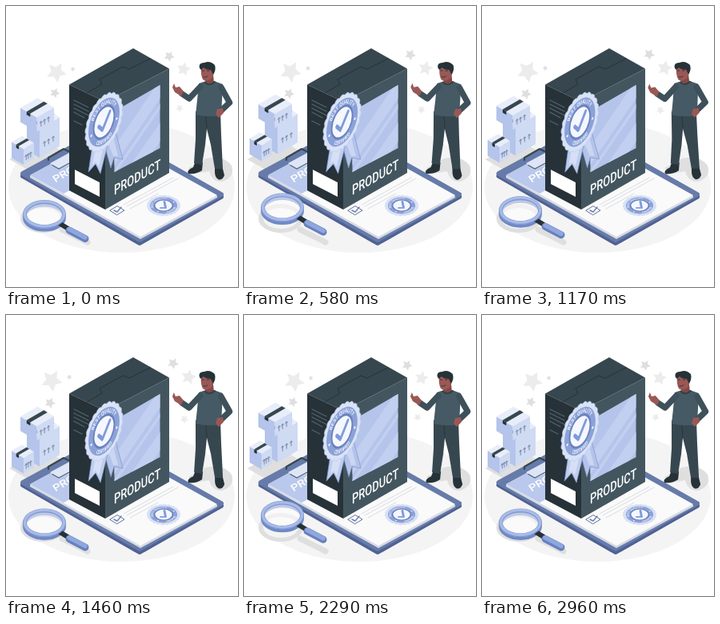
Recreate the animation shown at these times as an HTML page. Size 290x352 px, loop 3 s.

```html
<!DOCTYPE html>
<html lang="en">
<head>
<meta charset="utf-8">
<title>Product quality</title>
<style>
  html, body { margin: 0; width: 100%; height: 100%; overflow: hidden; background: #fff; }
  svg { display: block; width: 100vw; height: 100vh; }
  text { font-family: Roboto, Inter, sans-serif; font-weight: 500; fill: #fff; }
  .line { fill: none; stroke-linecap: round; stroke-linejoin: round; }
</style>
</head>
<body>
<svg viewBox="0 0 290 352">
  <defs>
    <path id="arcTop" d="M-20 0A20 20 0 0 1 20 0"/>
    <path id="arcLow" d="M-24.4 0A24.4 24.4 0 0 0 24.4 0"/>
    <clipPath id="pane"><path d="M135.5 132L192.5 99V178L135.5 208Z"/></clipPath>
    <g id="seal">
      <path class="scallop" fill="#d9e2f6" stroke="#b9c7ec" stroke-width=".7"/>
      <circle r="26.3" fill="#8ba2d9"/>
      <circle r="17.5" fill="#f4f7fd" stroke="#6a80bd" stroke-width="2.4"/>
      <path class="line" d="M-9 1L-2.5 8L10-8" stroke="#809ada" stroke-width="4.4"/>
      <text font-size="6.5" text-anchor="middle" font-weight="700"><textPath href="#arcTop" startOffset="50%">BEST QUALITY</textPath></text>
      <text font-size="6" text-anchor="middle" font-weight="700"><textPath href="#arcLow" startOffset="50%">CERTIFIED</textPath></text>
      <circle cx="-21.5" cy="6" r="1.4" fill="#fff"/>
      <circle cx="21.5" cy="6" r="1.4" fill="#fff"/>
    </g>
  </defs>

  <ellipse cx="144.5" cy="227" rx="141.5" ry="82" fill="#f4f4f4"/>
  <g id="stars"></g>

  <!-- ground shadows -->
  <g fill="#dfdfdf">
    <path d="M4 192L27 205L72 183L48 169Z"/>
    <path d="M228 203L250 191Q272 186 282 200Q287 214 270 220Q258 221 254 207L236 210Z"/>
    <ellipse cx="46" cy="266" rx="28" ry="18"/>
    <path class="line" d="M70 280L102 296" stroke="#dfdfdf" stroke-width="7"/>
  </g>
  <ellipse cx="46" cy="266" rx="22" ry="13" fill="#f4f4f4"/>

  <!-- clipboard -->
  <g stroke-linejoin="round" stroke-width="6">
    <path d="M21 213L124 157L269 239L167 297Z" fill="#506193" stroke="#506193"/>
    <path d="M21 210L124 154L269 236L167 293Z" fill="#667ba9" stroke="#667ba9"/>
  </g>
  <path d="M30 213L126 161L264 238V240L168 292L30 215Z" fill="#d6dae4"/>
  <path d="M30 212L126 160L264 237L168 289Z" fill="#fafafa"/>
  <path d="M30 212L126 160L168 183L72 235Z" fill="#b9c8ec"/>
  <text transform="matrix(.8 -.46 .45 .65 62 221.5)" font-size="16" font-weight="700">PRODUCT</text>
  <path d="M55 197L79 184V199L66 204Z" fill="#dde5f6"/>
  <path class="line" d="M53 193V190L72 179L78 182" stroke="#37474f" stroke-width="2.2"/>
  <path class="line" d="M58 199.5L66 204L79 197" stroke="#52656f" stroke-width="1.4"/>
  <g class="line" stroke="#d9dce3" stroke-width="1">
    <path d="M147 249L209 215M151 251L215 216M155 254L190 235"/>
  </g>
  <path class="line" d="M130 256L139 250.5L148 256L139 261.5Z" stroke="#526488" stroke-width=".9"/>
  <path class="line" d="M135 256L139 258L144 252" stroke="#6a80bd" stroke-width="1.4"/>
  <use href="#seal" transform="matrix(.46 -.28 .46 .28 197 250)"/>

  <!-- product box -->
  <path d="M79 98.5L159 53L204 78.5L124 120Z" fill="#37474f"/>
  <path d="M79 98.5L124 120V255L79 231Z" fill="#263238"/>
  <path d="M124 120L204 78.5V209L124 255Z" fill="#43565f"/>
  <path class="line" d="M101 109L120 98L117 92L146 76L154 79L180 66" stroke="#263238" stroke-width="1"/>
  <path class="line" d="M85 118L103 127M85 123L103 132M85 128L103 137M85 133L98 140M85 144L95 149" stroke="#52656f" stroke-width="1.2"/>
  <path d="M86 205L117 221V239L86 223Z" fill="#fff"/>
  <g clip-path="url(#pane)">
    <path d="M130 90H200V215H130Z" fill="#b5c4ea"/>
    <path d="M130 184L200 82V105L130 207ZM130 214L200 112V118L130 220ZM148 210L200 136V159L164 212Z" fill="#c2cff0"/>
  </g>
  <text transform="matrix(.74 -.42 0 1 135 237)" font-size="17.5">PRODUCT</text>

  <g id="badge">
    <path d="M122 170L131 203L135 190L146 192L137 158Z" fill="#b3c3ea" stroke="#7d92c9" stroke-width=".7"/>
    <path d="M128 172L134 188L140 188L134 164Z" fill="#cad6f2"/>
    <path d="M109 168L103 208L112 198L118 210L128 170Z" fill="#bfcdef" stroke="#7d92c9" stroke-width=".7"/>
    <path d="M113 172L108 199L112 195L116 201L123 172Z" fill="#d6dff5"/>
    <use href="#seal" transform="matrix(.74 -.5 0 1.06 122.5 145.5)"/>
  </g>

  <g id="crates"></g>

  <g id="lens">
    <ellipse cx="48" cy="265" rx="25" ry="15.5" fill="none" stroke="#6f88c6" stroke-width="4"/>
    <path class="line" d="M68 273L77 278.5" stroke="#263238" stroke-width="6"/>
    <path class="line" d="M79 281L99 291.5" stroke="#6680bd" stroke-width="9"/>
    <path class="line" d="M79 279.5L99 290" stroke="#8fa7de" stroke-width="5.5"/>
    <ellipse cx="48" cy="261" rx="23" ry="14" fill="#fff" opacity=".55"/>
    <ellipse cx="48" cy="261" rx="24.5" ry="15.5" fill="none" stroke="#7f98d4" stroke-width="5"/>
    <ellipse cx="48" cy="260.5" rx="24.5" ry="15.5" fill="none" stroke="#a9bbe7" stroke-width="3.2"/>
  </g>

  <g id="man">
    <path d="M237 194L246 196L245 206Q238 211 228 210Q225 206 234 202ZM261 200H270L273 212Q271 218 266 217.5Q261 215 261 208Z" fill="#263238"/>
    <path d="M237 132H268L269 162L271 204H261L256 174L251 154L249 174L245 199L235 197L237 167Z" fill="#37474f"/>
    <path class="line" d="M251 153L250 138" stroke="#263238" stroke-width=".8"/>
    <path d="M241 97L250 94L260 94L271 98L270 118L269 137Q252 140 237 136L239 118Z" fill="#455a64"/>
    <path class="line" d="M269 102L279.5 121L270 130" stroke="#3e515a" stroke-width="7.5"/>
    <path d="M264 129L271 128L272 134L266 140L262 136Z" fill="#9a5855"/>
    <path class="line" d="M243 101L229 116L220 110" stroke="#3e515a" stroke-width="7.5"/>
    <path d="M219 113L211 108L208 102L210 97L212 102L217 101L222 107Z" fill="#9a5855"/>
    <path d="M249 88L259 86L260 96Q254 101 249 96Z" fill="#834745"/>
    <path class="line" d="M249 96Q254 101 261 95" stroke="#2f4049" stroke-width="1.8"/>
    <path d="M244 77L258 76Q262 84 257 91Q250 96 246 92Q243 86 244 77Z" fill="#9a5855"/>
    <path d="M242 78Q240 71 248 71Q255 68 261 74Q263 80 259 86L256 80Q250 80 247 77L244 80Z" fill="#263238"/>
    <path class="line" d="M245.5 81H247.5M251.5 81H254M247 89Q250 90 252 88" stroke="#263238" stroke-width=".9"/>
  </g>
</svg>

<script>
  const $ = id => document.getElementById(id);
  const TAU = Math.PI * 2;
  const closed = pts => 'M' + pts.map(p => p.map(v => v.toFixed(2)).join(' ')).join('L') + 'Z';
  const ring = (n, radius, turn = 0) => Array.from({ length: n }, (_, i) => {
    const a = turn + i / n * TAU;
    return [radius(i) * Math.cos(a), radius(i) * Math.sin(a)];
  });

  document.querySelector('.scallop').setAttribute('d',
    closed(ring(240, i => 30.4 + 1.7 * Math.abs(Math.sin(i / 240 * TAU * 11)))));

  // x, y, radius, turn, fill
  const pale = '#ececec', grey = '#dfdfdf';
  $('stars').innerHTML = [
    [63, 83, 13, .2, pale], [83.5, 79, 3.2, .5, grey], [61, 109, 6.5, .1, grey],
    [204, 63, 6.8, .2, grey], [222, 79, 9, -.1, pale], [217, 128, 5, .3, pale]
  ].map(([x, y, r, turn, fill]) =>
    `<path transform="translate(${x} ${y})" fill="${fill}" d="${closed(ring(10, i => i % 2 ? r * .5 : r, turn))}"/>`
  ).join('');

  // Isometric carton: x, y is the front corner of the lid; w runs left, d right, h down.
  function crate(x, y, w, d, h) {
    const at = (a, b, c = 0) => [x - a * w + b * d, y - .58 * (a * w + b * d) + c];
    const face = (fill, ...pts) => `<path d="${closed(pts)}" fill="${fill}"/>`;
    const mark = b => {
      const [mx, my] = at(0, b, h * .62);
      return `M${mx} ${my + 3}v-6m-1.4 2.3l1.4-2.3l1.4 .7`;
    };
    return face('#b4c4ea', at(0, 0), at(1, 0), at(1, 0, h), at(0, 0, h))
      + face('#cfdaf3', at(0, 0), at(0, 1), at(0, 1, h), at(0, 0, h))
      + face('#e8edfa', at(0, 0), at(1, 0), at(1, 1), at(0, 1))
      + face('#37474f', at(.4, 0), at(.62, 0), at(.62, 1), at(.4, 1))
      + face('#263238', at(.4, 0), at(.62, 0), at(.62, 0, 4), at(.4, 0, 4))
      + `<path class="line" d="${mark(.25) + mark(.45) + mark(.68)}" stroke="#71809f" stroke-width=".9"/>`;
  }
  $('crates').innerHTML = crate(42, 154, 16, 25, 36) + crate(38.5, 139.5, 20.5, 21.5, 18)
    + crate(22, 179, 15, 13, 20);

  const move = (id, value) => $(id).setAttribute('transform', value);
  const sway = p => p < .25 ? 4 * p : p < .75 ? 2 - 4 * p : 4 * p - 4;
  const pulse = ms => ms < 840 ? 1 - Math.abs(ms - 420) / 420
    : ms < 1260 ? (ms - 840) / 420 : Math.max(0, (2100 - ms) / 840);

  function draw(now) {
    const ms = Math.floor(now % 3000 * .024 + .1) / .024;
    const p = ms / 1500 % 1;
    const lift = 1 - Math.abs(2 * p - 1);
    const angle = sway(p);
    move('stars', `translate(140 95) scale(${1 + .1 * pulse(ms)}) translate(-140 -95)`);
    move('lens', `translate(0 ${-10.8 * lift})`);
    move('crates', `translate(0 ${-5.8 * lift})`);
    move('man', `rotate(${angle} 247 144)`);
    move('badge', `rotate(${angle} 123 159)`);
  }
  const start = performance.now();
  function tick() {
    draw(performance.now() - start);
    requestAnimationFrame(tick);
  }
  tick();
</script>
</body>
</html>
```
